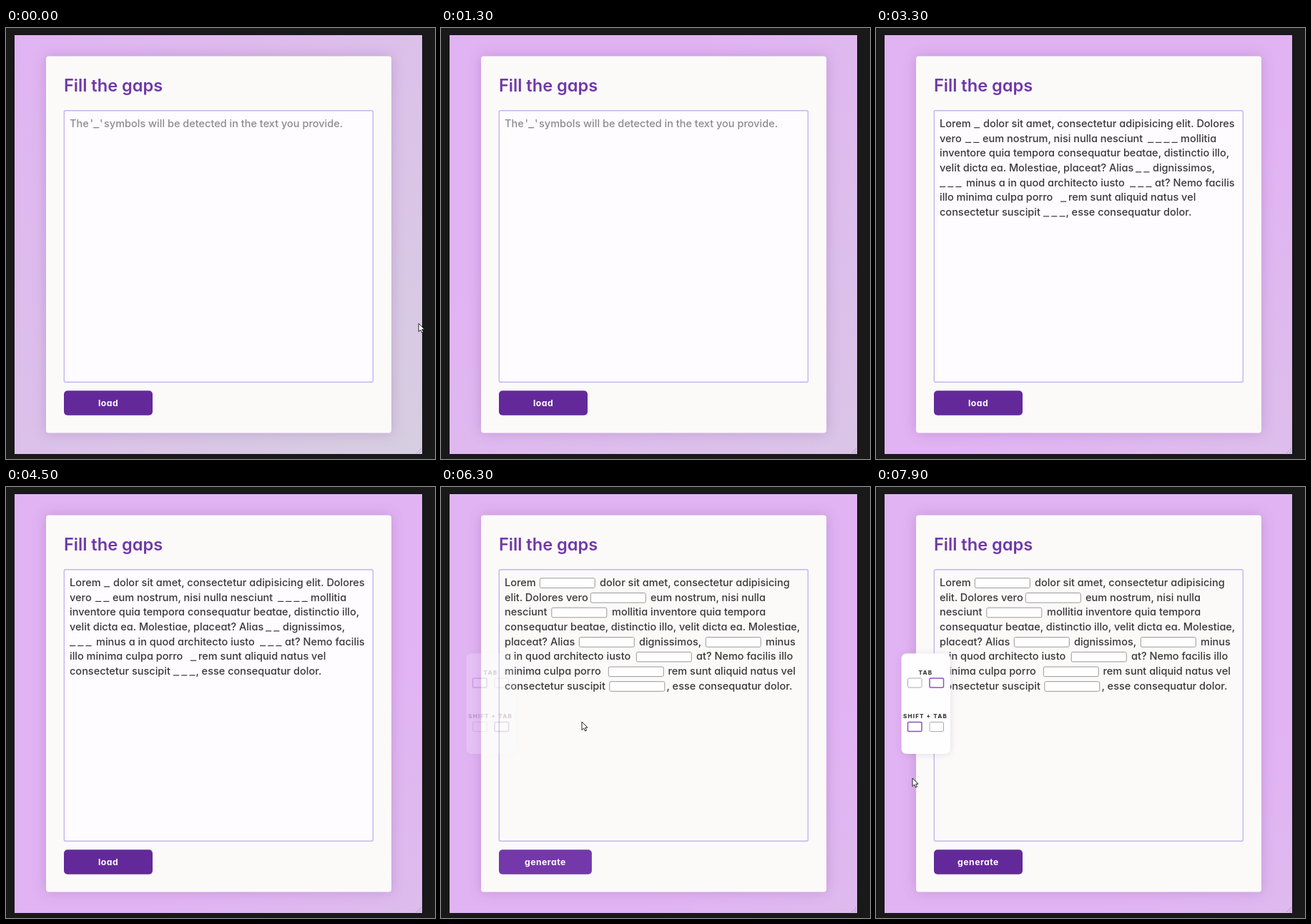
Recreate the animation shown at these times as an HTML page. Size 600 by 604 pixels, loop 8 s.

```html
<!DOCTYPE html>
<html lang="en">
<head>
<meta charset="utf-8">
<title>Fill the gaps</title>
<style>
html, body { margin: 0; width: 100%; height: 100%; overflow: hidden; background: #191919; }
#page { position: absolute; left: 12px; top: 10px; width: 570px; height: 587px; }
svg { position: absolute; left: 0; top: 0; font: 500 14.5px Inter, "Open Sans", sans-serif; font-feature-settings: "cv11"; }
text { fill: #3b373b; }
.hint text { fill: #8d8b8e; }
.hint .dash { fill: #777; }
.dash { fill: #3b373b; }
.gap { fill: #fefefe; stroke: #999; }
.title { font-size: 23.6px; font-weight: 600; fill: #7038a8; }
.label { font-size: 12.2px; font-weight: 700; letter-spacing: .5px; fill: #fff; text-anchor: middle; }
.key { font-size: 8px; font-weight: 800; letter-spacing: 1.2px; }
.card { filter: drop-shadow(0 0 9px rgba(90, 40, 120, .22)); }
.panel { filter: drop-shadow(0 1px 5px rgba(90, 40, 120, .14)); }
.pointer { fill: #fff; stroke: #222; stroke-linejoin: round; }
</style>
</head>
<body>
<div id="page"></div>
<svg width="600" height="604" viewBox="0 0 600 604">
  <path d="M574 596l7-7M578 596l3-3" stroke="#a99bb0" stroke-width=".8"/>
  <rect class="card" x="56" y="39.5" width="483" height="528" rx="4" fill="#fbfaf9"/>
  <text class="title" x="81" y="89">Fill the gaps</text>
  <rect id="area" x="81.3" y="115.7" width="432" height="380.6" rx="2" stroke="#c5b4ee" stroke-width="1.4"/>
  <g id="hint" class="hint"></g>
  <g id="plain"></g>
  <g id="gaps"></g>
  <rect id="caret" width="1" height="19" fill="#333"/>
  <rect id="button" x="81" y="508.3" height="34.5" rx="5"/>
  <text id="label" class="label" y="530"></text>
  <g id="panel">
    <rect class="panel" x="35.5" y="233.3" width="68.5" height="140.7" rx="7" fill="#fefdff"/>
    <text class="key" x="59.5" y="263">TAB</text>
    <text class="key" x="38" y="324">SHIFT + TAB</text>
    <g id="keys" fill="#fff"></g>
  </g>
  <path id="arrow" class="pointer" d="M0 0V11.5L2.7 9L4.6 13L6.5 12.1L4.7 8.2H8Z"/>
  <path id="hand" class="pointer" d="M-2 -6Q-.8 -7.5 .2 -6V-1.5L1.3 -2.2L2.3 -1.2L3.7 -1.6L4.6 -.5L6 0V4.5L4.5 8.5H-1L-4.5 3Q-5 1 -3.5 1.2L-2 2.7Z"/>
</svg>
<script>
const $ = id => document.getElementById(id);
const clamp = x => Math.max(0, Math.min(1, x));
const ease = x => (x = clamp(x)) * x * (3 - 2 * x);
const mix = (a, b, k) => a.map((v, i) => v + (b[i] - v) * k);
const rgb = c => `rgb(${c.map(Math.round)})`;
const show = (id, on) => $(id).style.display = on ? "" : "none";

// Each piece is "x text"; underscores are dashes and # is an input box.
const piece = (s, row) => {
  const cut = s.indexOf(" "), x = +s.slice(0, cut), text = s.slice(cut + 1);
  const y = 138.8 + row * 20.7;
  if (text === "#")
    return `<rect class="gap" x="${x + .3}" y="${y - 11}" width="77" height="13.6" rx="2"/>`;
  if (text[0] === "_")
    return [...text].map((_, i) =>
      `<rect class="dash" x="${x + i * 11.2}" y="${y + .3}" width="8.2" height="1.2"/>`).join("");
  return `<text x="${x}" y="${y}">${text}</text>`;
};
const fill = (id, lines) => $(id).innerHTML =
  lines.map((line, row) => line.split("|").map(s => piece(s, row)).join("")).join("");

fill("hint", ["89 The|117.5 '|122 _|131 '|137 symbols will be detected in the text you provide."]);
fill("plain", [
  "89 Lorem|137 _|150 dolor sit amet, consectetur adipisicing elit. Dolores",
  "89 vero|125 __|149 eum nostrum, nisi nulla nesciunt|380 ____|426 mollitia",
  "89 inventore quia tempora consequatur beatae, distinctio illo,",
  "89 velit dicta ea. Molestiae, placeat? Alias|363 __|387 dignissimos,",
  "89 ___|126 minus a in quod architecto iusto|355 ___|390 at? Nemo facilis",
  "89 illo minima culpa porro|258 _|269 rem sunt aliquid natus vel",
  "89 consectetur suscipit|234 ___|265.5 , esse consequatur dolor."
]);
fill("gaps", [
  "89 Lorem|138 #|222 dolor sit amet, consectetur adipisicing",
  "89 elit. Dolores vero|209 #|293 eum nostrum, nisi nulla",
  "89 nesciunt|154.5 #|239 mollitia inventore quia tempora",
  "89 consequatur beatae, distinctio illo, velit dicta ea. Molestiae,",
  "89 placeat? Alias|193 #|277 dignissimos,|370 #|454 minus",
  "89 a in quod architecto iusto|273 #|357 at? Nemo facilis illo",
  "89 minima culpa porro|234 #|317.5 rem sunt aliquid natus vel",
  "89 consectetur suscipit|235.5 #|315.5 , esse consequatur dolor."
]);
$("keys").innerHTML = [[44.5, 268], [75, 268], [44.5, 329.5], [75, 329.5]].map(([x, y]) =>
  `<rect x="${x}" y="${y}" width="19.5" height="13" rx="1.5"/>`).join("");

const PASTE = 2700, HOVER = 5000, LOAD = 5800, LEAVE = 6080, PANEL = 6200;

function draw(t) {
  const shift = 80 * (1 - Math.exp(-t / 2500));
  $("page").style.background =
    `linear-gradient(135deg, #e1b3f3 ${shift}%, #d6cee0 ${100 + shift}%)`;

  const pasted = t >= PASTE, loaded = t >= LOAD;
  show("hint", !pasted);
  show("plain", pasted && !loaded);
  show("gaps", loaded);
  $("area").setAttribute("fill", loaded ? "#fbfaf9" : "#fefcff");

  show("caret", t >= 1700 && !loaded && (t - 1700) % 1000 < 500);
  $("caret").setAttribute("x", pasted ? 441 : 89);
  $("caret").setAttribute("y", pasted ? 248.5 : 124.5);

  const hover = ease((t - HOVER) / 300) * (1 - ease((t - LEAVE) / 400));
  const width = 124 + 14 * hover;
  $("button").setAttribute("width", width);
  $("button").setAttribute("fill", rgb(mix([99, 41, 154], [140, 77, 193], hover)));
  $("label").setAttribute("x", 81 + width / 2);
  $("label").textContent = loaded ? "generate" : "load";

  show("panel", t >= PANEL);
  $("panel").setAttribute("opacity", ease((t - PANEL + 60) / 560));
  const second = Math.floor((t - PANEL) / 1000) % 2;
  [...$("keys").children].forEach((key, i) => {
    const lit = (i === 0 || i === 3) !== !!second;
    key.setAttribute("stroke", lit ? "#8b52c7" : "#aaa");
    key.setAttribute("stroke-width", lit ? 1.5 : 1);
  });

  let at = [577 + t * .12, 414];
  if (t >= LEAVE) at = mix([160, 500], [197, 329], ease((t - LEAVE) / 220));
  if (t >= 6300) at = mix([197, 329], [51, 408], ease((t - 6500) / 1000));
  show("arrow", t < 200 || t >= LEAVE);
  $("arrow").setAttribute("transform", `translate(${at})`);

  show("hand", t >= HOVER && t < LEAVE);
  const handY = 512 + 15 * ease((t - HOVER) / 300) - 16 * ease((t - 5900) / 180);
  $("hand").setAttribute("transform", `translate(157.5 ${handY})`);
}

const start = performance.now();
(function frame() {
  draw((performance.now() - start) % 8000);
  requestAnimationFrame(frame);
})();
</script>
</body>
</html>
```
